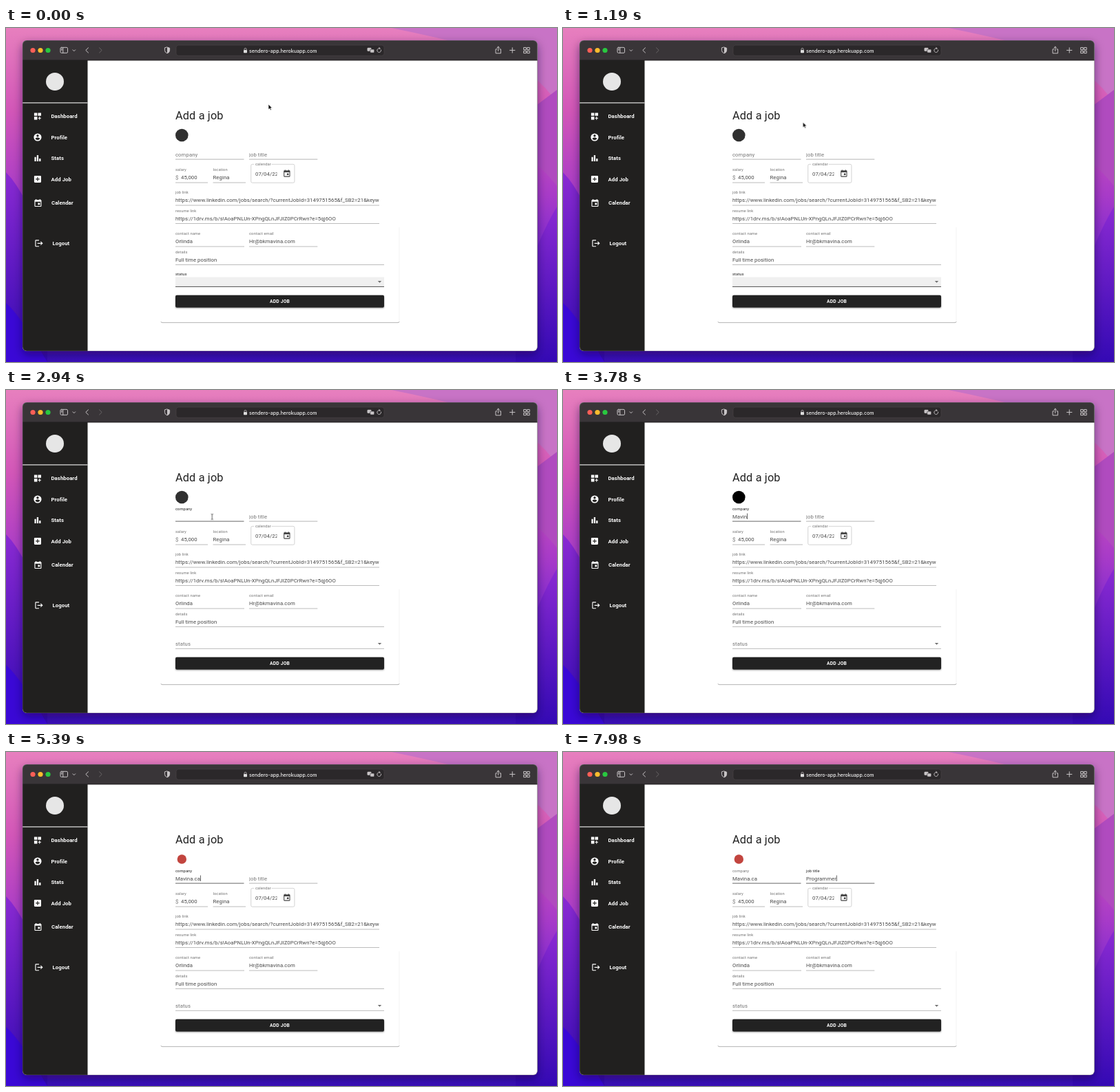
These frames come from a looping animation (800 by 486 pixels, 8000 ms). An HTML page:

```html
<!DOCTYPE html>
<html lang="en">
<head>
<meta charset="utf-8">
<title>Add a job</title>
<style>
  html, body { margin: 0; width: 100%; height: 100%; overflow: hidden; background: #8a2fd0; }
  svg { display: block; }
  #stage { width: 100%; height: 100%; }
  text { font: 7.74px Roboto, sans-serif; letter-spacing: .0094em; white-space: pre; }
  .value { fill: #484848; }
  .label { fill: #757575; }
  .small { font-size: 5.8px; }
  .line { fill: #ababab; }
  .nav text { font-weight: 700; fill: #fff; }
  .title { font-size: 16.3px; fill: #222; }
  .address { font: 500 7.05px Inter, sans-serif; letter-spacing: 0; fill: #f2f2f2; }
  .button { font-size: 6.78px; font-weight: 700; letter-spacing: .0286em; fill: #fff; text-anchor: middle; }
  .stroke { fill: none; stroke: #c9c5c7; stroke-width: 1; stroke-linecap: round; stroke-linejoin: round; }

  .a { animation: 8s infinite step-end; }
  #cursor { animation: travel 8s infinite linear; }
  #arrow { animation-name: arrow; }
  #beam { animation-name: beam; }
  #company-line { animation-name: hover; }
  #title-line { animation-name: titleLine; }
  #status-fill { animation-name: statusFill; }
  #avatar { animation-name: avatar; }
  #company-label { animation: companyShrink 8s infinite cubic-bezier(0,0,.2,1), companyInk 8s infinite step-end; }
  #title-label { animation: titleShrink 8s infinite cubic-bezier(0,0,.2,1), titleInk 8s infinite step-end; }
  #status-label { animation: statusGrow 8s infinite cubic-bezier(0,0,.2,1), statusInk 8s infinite step-end; }

  @keyframes travel {
    0%, 5% { transform: translate(381px, 111px); animation-timing-function: ease-in; }
    14.875% { transform: translate(348.5px, 137px); animation-timing-function: ease-out; }
    21%, 28% { transform: translate(300px, 184.5px); }
    31%, 100% { transform: translate(299.3px, 184.5px); }
  }
  @keyframes arrow { 0% { opacity: 1; } 18%, 100% { opacity: 0; } }
  @keyframes beam { 0% { opacity: 0; } 18% { opacity: 1; } 40%, 100% { opacity: 0; } }
  @keyframes hover { 0% { fill: #ababab; } 18%, 100% { fill: #555; } }
  @keyframes titleLine { 0% { fill: #ababab; } 71.25%, 100% { fill: #555; } }
  @keyframes statusFill { 0% { opacity: 1; } 30%, 100% { opacity: 0; } }
  @keyframes avatar {
    0% { fill: #303030; r: 9.3px; }
    40% { fill: #000; r: 9.3px; }
    61.5%, 100% { fill: #c2453f; r: 6.7px; }
  }
  @keyframes companyShrink {
    0%, 30% { transform: none; }
    32.5%, 100% { transform: translateY(-12px) scale(.75); }
  }
  @keyframes titleShrink {
    0%, 71.25% { transform: none; }
    73.75%, 100% { transform: translateY(-12px) scale(.75); }
  }
  @keyframes statusGrow {
    0%, 30% { transform: translateY(-12px) scale(.75); }
    32.5%, 100% { transform: none; }
  }
  @keyframes companyInk { 0% { fill: #757575; } 30% { fill: #222; } 71.25%, 100% { fill: #757575; } }
  @keyframes titleInk { 0% { fill: #757575; } 71.25%, 100% { fill: #222; } }
  @keyframes statusInk { 0% { fill: #222; } 30%, 100% { fill: #757575; } }
</style>
</head>
<body>
<svg id="stage" viewBox="0 0 800 486">
  <defs>
    <linearGradient id="sky" x2="0" y2="1">
      <stop offset="0" stop-color="#e77fbe"/>
      <stop offset=".25" stop-color="#d256b8"/>
      <stop offset=".5" stop-color="#a83bc8"/>
      <stop offset=".75" stop-color="#6a20d6"/>
      <stop offset="1" stop-color="#3a0fb8"/>
    </linearGradient>
    <linearGradient id="deep" x2="0" y2="1">
      <stop offset="0" stop-color="#8a2ad2"/>
      <stop offset="1" stop-color="#3409b4"/>
    </linearGradient>
    <filter id="shadow" x="-10%" y="-10%" width="120%" height="125%">
      <feDropShadow dx="0" dy="5" stdDeviation="7" flood-color="#100030" flood-opacity=".5"/>
    </filter>
    <filter id="lift" x="-5%" y="-30%" width="110%" height="180%">
      <feDropShadow dx="0" dy="1" stdDeviation=".9" flood-opacity=".4"/>
    </filter>
    <clipPath id="frame"><rect x="24" y="18" width="747.5" height="452" rx="6"/></clipPath>
    <clipPath id="link-clip"><rect x="240" y="240" width="302" height="20"/></clipPath>
    <clipPath id="date-clip"><rect x="360" y="203" width="33.6" height="16"/></clipPath>
    <path id="event" d="M19 4h-1V2h-2v2H8V2H6v2H5a2 2 0 0 0-2 2v14a2 2 0 0 0 2 2h14a2 2 0 0 0 2-2V6a2 2 0 0 0-2-2zm0 16H5V9h14zM12 12h5v5h-5z" fill-rule="evenodd"/>
  </defs>

  <!-- wallpaper -->
  <rect width="800" height="486" fill="url(#sky)"/>
  <path d="M560 0H800V110Q770 60 690 30Q620 12 560 0Z" fill="#c873c6"/>
  <path d="M800 90V230Q780 205 760 190V120Z" fill="#b04bbf"/>
  <path d="M0 210Q30 240 60 330V486H0Z" fill="url(#deep)"/>
  <path d="M800 260Q775 300 740 400V486H800Z" fill="url(#deep)"/>
  <path d="M0 400Q22 420 60 486H0Z" fill="#3a08d6"/>

  <!-- browser window -->
  <rect x="24" y="18" width="747.5" height="452" rx="6" fill="#333" filter="url(#shadow)"/>
  <g clip-path="url(#frame)">
    <rect x="24" y="18" width="748" height="452" fill="#fff"/>
    <rect x="24" y="18" width="748" height="29.2" fill="#393538"/>
    <rect x="24" y="46.5" width="748" height=".8" fill="#1c1a1b"/>
    <rect x="24" y="47" width="94.5" height="424" fill="#21201f"/>
    <rect x="24" y="108.3" width="94.5" height="1.2" fill="#e4e4e4"/>
  </g>
  <rect x="24.3" y="18.3" width="747" height="451.5" rx="6" fill="none" stroke="#777" stroke-opacity=".55" stroke-width=".6"/>

  <circle cx="39" cy="32.5" r="3.6" fill="#fc5f57"/>
  <circle cx="50" cy="32.5" r="3.6" fill="#fdbc2e"/>
  <circle cx="61" cy="32.5" r="3.6" fill="#29c840"/>
  <g class="stroke">
    <rect x="79" y="28.3" width="10.5" height="8" rx="1.5"/>
    <path d="M82.8 28.5V36M80.4 30.3h1M80.4 32h1M97 31.8l1.8 1.8 1.8-1.8M119.5 28.8l-3.7 3.6 3.7 3.6"/>
    <path d="M135.5 28.8l3.7 3.6-3.7 3.6" stroke="#686466"/>
    <path d="M234 28l3.6 1.2v3.2q0 3-3.6 4.5q-3.6-1.5-3.6-4.5v-3.2z"/>
    <path d="M712.6 30.8h-1.6v6h7.4v-6h-1.6M714.7 33.5v-6.3M712.8 29l1.9-1.9 1.9 1.9M731.5 32.4h7.4M735.2 28.7v7.4"/>
    <path d="M752 28.4h3.2v3.2H752zM757 28.4h3.2v3.2H757zM752 33.4h3.2v3.2H752zM757 33.4h3.2v3.2H757z"/>
  </g>
  <path d="M234 28l3.6 1.2v3.2q0 3-3.6 4.5z" fill="#c9c5c7"/>
  <rect x="247" y="25" width="302" height="15.3" rx="3.5" fill="#2b282a" stroke="#4a4648" stroke-width=".6"/>
  <rect x="345" y="32" width="5" height="4.3" rx=".7" fill="#ddd"/>
  <path class="stroke" d="M346 32v-1.2a1.5 1.5 0 0 1 3 0v1.2" style="stroke-width:.8"/>
  <text class="address" x="353" y="35.6">sendero-app.herokuapp.com</text>
  <rect x="524.5" y="28.7" width="6" height="5" rx="1.2" fill="#c9c5c7"/>
  <rect x="528.7" y="31" width="6" height="5" rx="1.2" fill="#c9c5c7" stroke="#2b282a" stroke-width=".6"/>
  <path class="stroke" d="M544.6 32a2.9 2.9 0 1 1-1.5-2h-1.5M543.2 30l-1.4-1.8" style="stroke-width:.9"/>

  <!-- sidebar -->
  <circle cx="71" cy="78" r="13" fill="#e6e6e6"/>
  <g class="nav" id="nav" fill="#fff" fill-rule="evenodd"></g>

  <!-- form -->
  <path d="M225 427.2q0 1.5 2 1.5H569q2 0 2-1.5" fill="none" stroke="#aaa" stroke-width=".9"/>
  <path d="M571 290V427" stroke="#f0f0f0" stroke-width=".8"/>
  <text class="title" x="246" y="132.6">Add a job</text>
  <circle id="avatar" class="a" cx="255.3" cy="156" r="9.3"/>
  <g id="fields"></g>

  <rect id="company-line" class="a" x="246" y="190.6" width="99.5" height=".9"/>
  <g transform="translate(246 186.5)"><text id="company-label">company</text></g>
  <text class="value" id="company" x="246" y="186.5"></text>
  <rect id="title-line" class="a" x="353" y="190.6" width="99.3" height=".9"/>
  <g transform="translate(353 186.5)"><text id="title-label">job title</text></g>
  <text class="value" id="job-title" x="353" y="186.5"></text>
  <rect id="caret" y="179.5" width=".7" height="8.5" fill="#222"/>

  <rect x="355.7" y="198.3" width="63.2" height="26.9" rx="2" fill="none" stroke="#c0c0c0" stroke-width=".7"/>
  <rect x="360" y="197" width="25.5" height="3" fill="#fff"/>
  <text class="label small" x="362" y="200.4">calendar</text>
  <text class="value" x="362" y="214.5" clip-path="url(#date-clip)">07/04/22</text>
  <use href="#event" transform="translate(401.6 205.2) scale(.52)" fill="#444"/>

  <g id="status-fill" class="a">
    <rect x="246" y="362.5" width="303" height="14" fill="#f0f0f0"/>
    <rect x="246" y="375.9" width="303" height="1" fill="#555"/>
  </g>
  <g transform="translate(246 371.5)"><text id="status-label">status</text></g>
  <path d="M539.8 368h5.4l-2.7 2.7z" fill="#707070"/>

  <rect x="246" y="388.7" width="303" height="18" rx="2" fill="#212121" filter="url(#lift)"/>
  <text class="button" x="397.5" y="400.1">ADD JOB</text>

  <g id="cursor">
    <path id="arrow" class="a" d="M0 0V7.6l1.8-1.6 1.2 2.7 1.3-.6-1.2-2.6h2.4z" stroke="#fff" stroke-width=".6" fill="#111"/>
    <path id="beam" class="a" d="M-1.6-4Q0-4 0-3Q0-4 1.6-4M0-3V3M-1.6 4Q0 4 0 3Q0 4 1.6 4" fill="none" stroke="#333" stroke-width=".8"/>
  </g>
</svg>
<script>
  const $ = id => document.getElementById(id);

  const navItems = [
    ['Dashboard', 65.5, 128.3, 46, 'M3 3h8v8H3zM13 3h8v8h-8zM3 13h8v8H3zM18 13h-2v3h-3v2h3v3h2v-3h3v-2h-3z'],
    ['Profile', 65.5, 158.9, 46, 'M12 2a10 10 0 1 0 0 20a10 10 0 1 0 0-20zM12 5a3 3 0 1 1 0 6a3 3 0 1 1 0-6zM6 16c0-4 12-4 12 0q-2 3.2-6 3.2t-6-3.2z'],
    ['Stats', 65.5, 189.3, 46, 'M4 9h4v11H4zM10 4h4v16h-4zM16 13h4v7h-4z'],
    ['Add Job', 65.5, 219.8, 46, 'M5 3h14a2 2 0 0 1 2 2v14a2 2 0 0 1-2 2H5a2 2 0 0 1-2-2V5a2 2 0 0 1 2-2zM17 13v-2h-4V7h-2v4H7v2h4v4h2v-4z'],
    ['Calendar', 66, 254.4, 46.5, $('event').getAttribute('d')],
    ['Logout', 67.5, 313.2, 48, 'M17 7l-1.4 1.4 2.6 2.6H8v2h10.2l-2.6 2.6L17 17l5-5zM4 5h8V3H4a2 2 0 0 0-2 2v14a2 2 0 0 0 2 2h8v-2H4z'],
  ];
  $('nav').innerHTML = navItems.map(([name, x, y, iconX, d]) =>
    `<path transform="translate(${iconX - 6.8} ${y - 6.6}) scale(.56)" d="${d}"/>
     <text x="${x}" y="${y + 2.8}">${name}</text>`).join('');

  // label, value, left edge, width, underline y, value indent, extra attributes
  const fields = [
    ['salary', '45,000', 246, 47, 225, 8],
    ['location', 'Regina', 300.5, 47.5, 225],
    ['job link', 'https://www.linkedin.com/jobs/search/?currentJobId=3149751565&amp;f_SB2=21&amp;keyword', 246, 296, 258, 0, 'clip-path="url(#link-clip)"'],
    ['resume link', 'https://1drv.ms/b/s!AoaPNLUn-XPngQLnJFJIZ0PCrRwn?e=5qj6OO', 246, 296, 284.5],
    ['contact name', 'Orlinda', 246, 100, 318],
    ['contact email', 'Hr@bkmavina.com', 353, 99.3, 318],
    ['details', 'Full time position', 246, 303, 344.5],
    ['', '', 246, 303, 376.3],
  ];
  $('fields').innerHTML = fields.map(([label, value, x, width, y, indent = 0, extra = '']) =>
    `<text class="label small" x="${x}" y="${y - 17}">${label}</text>
     <text class="value" x="${x + indent}" y="${y - 4.9}" ${extra}>${value}</text>
     <rect class="line" x="${x}" y="${y - .4}" width="${width}" height=".8"/>`).join('') +
    '<text class="label" x="246" y="220.1">$</text>';

  const inputs = [
    { node: $('company'), text: 'Mavina.ca', focus: 2400, blur: 5700, start: 3200, step: 137 },
    { node: $('job-title'), text: 'Programmer', focus: 5700, blur: 8000, start: 6370, step: 118 },
  ];

  function type(input, t) {
    const { node, text, focus, blur, start, step } = input;
    const count = Math.max(0, Math.min(text.length, Math.floor((t - start) / step) + 1));
    const shown = text.slice(0, count);
    if (node.textContent !== shown) node.textContent = shown;
    if (t < focus || t >= blur) return false;
    const lastKey = count ? start + (count - 1) * step : focus;
    $('caret').setAttribute('x', +node.getAttribute('x') + (count ? node.getComputedTextLength() : 0));
    return t - lastKey < 600 || Math.floor((t - lastKey) / 500) % 2 === 0;
  }

  let begin;
  function draw(now) {
    begin ??= now;
    const t = (now - begin) % 8000;
    const caretOn = inputs.map(input => type(input, t)).some(Boolean);
    // the caret is already in its off phase before the first key
    const waiting = t > 2900 && t < 3200;
    $('caret').setAttribute('opacity', caretOn && !waiting ? 1 : 0);
    requestAnimationFrame(draw);
  }
  requestAnimationFrame(draw);
</script>
</body>
</html>
```
